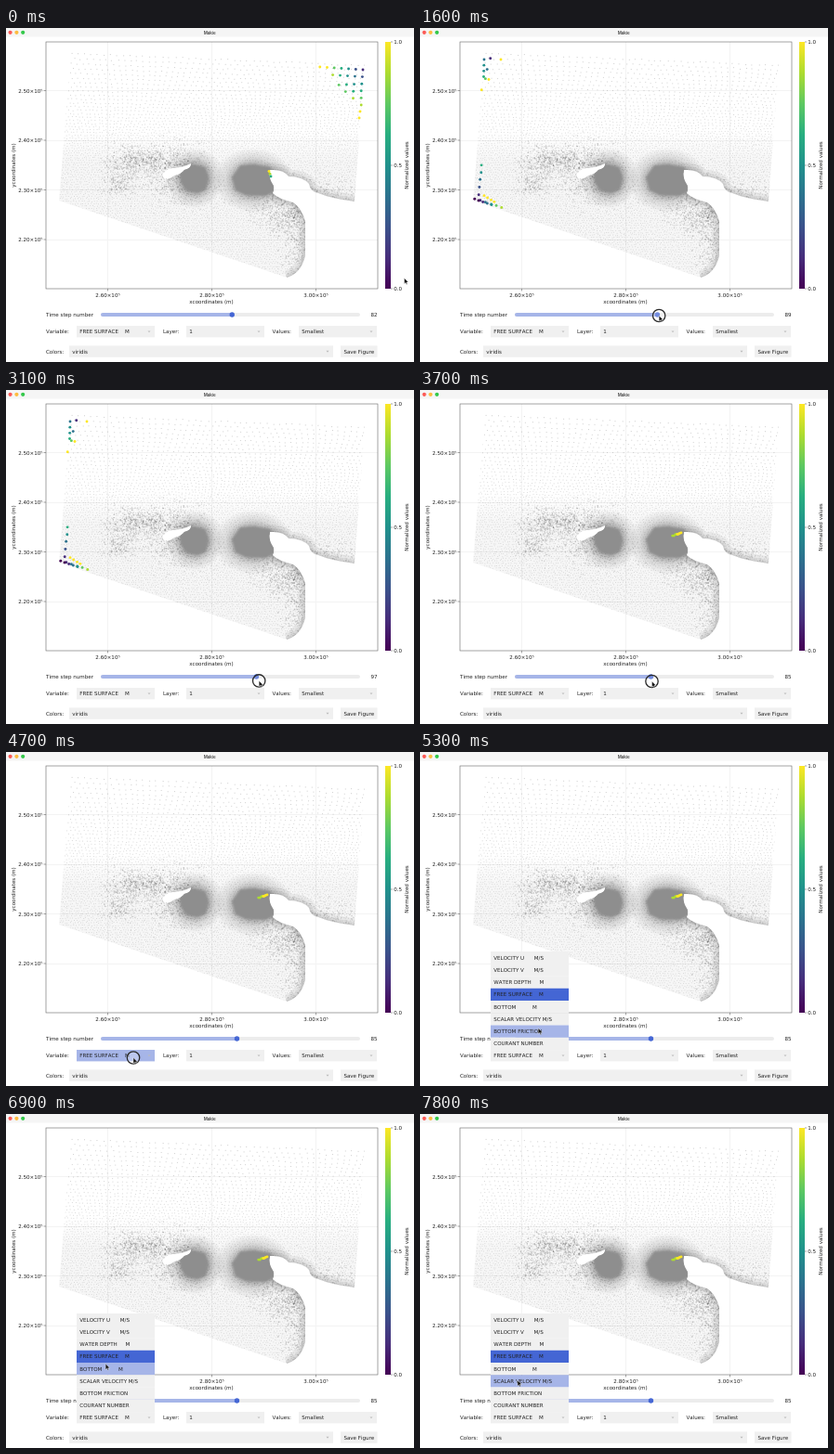
Animation, 439 px wide and 360 px high, one loop 8000 ms. Source, as an HTML page with a canvas:

```html
<!DOCTYPE html>
<html lang="en">
<head>
<meta charset="utf-8">
<title>Makie</title>
<style>
html, body { margin: 0; width: 100%; height: 100%; overflow: hidden; background: #fff; }
canvas, svg { position: absolute; left: 0; top: 0; width: 439px; height: 360px; display: block; }
text { font: 5.55px "DejaVu Sans", sans-serif; font-kerning: none; fill: #222; white-space: pre; }
.title { font: 600 4.5px Inter, sans-serif; fill: #444; }
</style>
</head>
<body>
<canvas id="mesh" width="439" height="360"></canvas>
<svg id="ui" viewBox="0 0 439 360"></svg>
<script>
const LOOP = 8000, STEP = 100;
const ACCENT = '#4466d4', DIM = '#a6b5e8', PANEL = '#f0f0f0';
const VIRIDIS = ['#440154', '#472d7b', '#3b528b', '#2c728e', '#21918c', '#28ae80', '#5ec962', '#addc30', '#fde725'];
const ui = document.getElementById('ui');

let seed = 11;
const rnd = () => (seed = (seed * 16807) % 2147483647) / 2147483647;
const jitter = size => (rnd() - 0.5) * size;

function add(tag, attrs, parent = ui) {
  const el = document.createElementNS('http://www.w3.org/2000/svg', tag);
  set(el, attrs);
  parent.appendChild(el);
  return el;
}
function set(el, attrs) { for (const k in attrs) el.setAttribute(k, attrs[k]); }
const show = (el, on) => { el.style.display = on ? '' : 'none'; };
const rect = (x, y, width, height, fill, parent) => add('rect', { x, y, width, height, fill }, parent);
const line = (x1, y1, x2, y2) => add('line', { x1, y1, x2, y2, stroke: '#666', 'stroke-width': 0.6 });
function label(x, y, str, anchor = 'start', parent = ui) {
  const el = add('text', { x, y: y + 2.05, 'text-anchor': anchor }, parent);
  el.textContent = str;
  return el;
}
function turned(x, y, str) {
  label(0, 0, str, 'middle').setAttribute('transform', `translate(${x} ${y}) rotate(-90)`);
}

const xTicks = [0, 1, 2].map(i => [109 + 112 * i, `${(2.6 + 0.2 * i).toFixed(2)}×10⁵`]);
const yTicks = [0, 1, 2, 3].map(i => [67.5 + 53.5 * i, `${(2.5 - 0.1 * i).toFixed(2)}×10⁵`]);

// ---- mesh ----
function drawMesh() {
  const g = document.getElementById('mesh').getContext('2d');
  g.fillStyle = '#f3f3f3';
  for (const [x] of xTicks) g.fillRect(x, 15, 1, 266);
  for (const [y] of yTicks) g.fillRect(43, Math.floor(y), 357, 1);

  const coast = 'L375 187Q350 184 336 178Q327 176 326 168Q319 160 304 160Q299 152 284 153Q282 160 286 167' +
    'Q290 172 287 178Q293 184 309 188Q318 194 322 208L322 246Q317 265 302 269';
  const isle = 'M168 158Q174 150 181 151Q191 150 199 146Q200 151 192 153Q188 158 181 159Q176 164 170 162Z';
  g.clip(new Path2D('M70 25L386 38' + coast + 'L57 186Z' + isle), 'evenodd');

  // soft shade that thickens below the coarse rows
  const shade = g.createLinearGradient(0, 110, 0, 145);
  shade.addColorStop(0, 'rgba(0,0,0,0)');
  shade.addColorStop(1, 'rgba(0,0,0,.035)');
  g.fillStyle = shade;
  g.fillRect(43, 110, 357, 170);

  // rows of nodes, closer together towards the middle
  for (let y = 27, row = 0; y < 270; row++) {
    const k = Math.min(1, (y - 27) / 100), dx = 7 - 4.2 * k;
    g.fillStyle = `rgba(0,0,0,${0.2 - 0.07 * k})`;
    for (let x = 56 + (row % 2) * dx / 2; x < 388; x += dx)
      g.fillRect(x + jitter(1.6), y + (x - 70) * 0.041 * (1 - k) + jitter(1.5), 1, 1);
    y += 5.6 - 3 * k;
  }

  // speckled shoals: centre, radii, number of nodes
  function cloud(cx, cy, rx, ry, n) {
    g.fillStyle = 'rgba(0,0,0,.13)';
    const gauss = () => rnd() + rnd() + rnd() - 1.5;
    for (let i = 0; i < n; i++) g.fillRect(cx + gauss() * rx, cy + gauss() * ry, 1.3, 1.3);
  }
  cloud(150, 142, 40, 14, 480);
  cloud(128, 150, 20, 28, 220);
  cloud(120, 169, 16, 10, 110);
  cloud(182, 158, 38, 34, 650);
  cloud(306, 198, 36, 24, 650);
  cloud(316, 236, 20, 70, 500);
  cloud(320, 176, 110, 18, 500);

  // darker rim along the coast
  g.strokeStyle = 'rgba(0,0,0,.06)';
  for (const w of [3, 8, 15]) {
    g.lineWidth = w;
    g.stroke(new Path2D('M375 187' + coast));
  }

  function halo(cx, cy, rx, ry) {
    g.save();
    g.translate(cx, cy);
    g.scale(rx, ry);
    const fade = g.createRadialGradient(0, 0, 0.4, 0, 0, 1);
    fade.addColorStop(0, 'rgba(0,0,0,.34)');
    fade.addColorStop(0.5, 'rgba(0,0,0,.11)');
    fade.addColorStop(1, 'rgba(0,0,0,0)');
    g.fillStyle = fade;
    g.fillRect(-1, -1, 2, 2);
    g.restore();
  }
  halo(203, 162, 32, 33);
  halo(266, 164, 43, 35);
  g.filter = 'blur(1.1px)';
  g.fillStyle = '#8e8e8e';
  g.fill(new Path2D('M187 153L199 147L214 150L218 161L215 174L206 178L194 175L188 166Z' +
    'M243 161L252 148L267 147L284 150L290 164L287 177L279 181L258 180L247 175Z'));
}
drawMesh();

// ---- window and axes ----
rect(0, 0, 439, 9.5, '#f5f5f5');
['#fc5b57', '#fdbc40', '#34c84a'].forEach((fill, i) => add('circle', { cx: 4.6 + i * 6.8, cy: 4.8, r: 2.1, fill }));
label(219.2, 4.6, 'Makie', 'middle').setAttribute('class', 'title');
add('rect', { x: 43, y: 15, width: 357, height: 266, fill: 'none', stroke: '#666', 'stroke-width': 0.6 });
for (const [x, s] of xTicks) { line(x + 0.5, 281, x + 0.5, 283.5); label(x + 0.5, 287.8, s, 'middle'); }
for (const [y, s] of yTicks) { line(40.5, y, 43, y); label(39.5, y, s, 'end'); }
label(221, 295, 'xcoordinates (m)', 'middle');
turned(8.3, 148, 'ycoordinates (m)');

const grad = add('linearGradient', { id: 'viridis', x1: 0, y1: 1, x2: 0, y2: 0 });
VIRIDIS.forEach((c, i) => add('stop', { offset: i / 8, 'stop-color': c }, grad));
add('rect', { x: 408, y: 15, width: 6, height: 266, fill: 'url(#viridis)' });
['1.0', '0.5', '0.0'].forEach((s, i) => {
  const y = 15 + 133 * i;
  line(414, y, 416, y);
  label(417.3, y, s);
});
turned(431.3, 148, 'Normalized values');

// ---- coloured points ----
const group = () => add('g', {});
const dot = (g, cx, cy, c) => add('circle', { cx, cy, r: 1.45, fill: VIRIDIS[Math.round(Math.min(8, c))] }, g);

// n points on a line, colour index from c0 to c1
function run(g, n, x0, y0, x1, y1, c0, c1, loose = 0) {
  for (let i = 0; i < n; i++) {
    const k = i / (n - 1);
    dot(g, x0 + (x1 - x0) * k + jitter(loose), y0 + (y1 - y0) * k + jitter(loose), c0 + (c1 - c0) * k);
  }
}

// fan in the corner: values grow with the distance from it
const right = group();
[7, 5, 4, 3, 2, 1].forEach((n, row) => {
  for (let j = 0; j < n; j++) {
    const dx = j * (7.7 + row * 0.25) + Math.min(row, 3) * 0.6, dy = row * 7.6 - j * 0.5 + (row > 1 ? j * 0.9 : 0);
    dot(right, 384 - dx, 45 + dy, 1 + 0.17 * Math.hypot(dx, dy));
  }
});
const rightEarly = group();
run(rightEarly, 2, 381, 90, 380, 97, 8, 8);
run(rightEarly, 3, 283, 154.5, 285, 160, 8, 5);
const rightLate = group();
run(rightLate, 3, 275, 157.5, 279, 154.7, 7, 8);

const left = group();
run(left, 4, 69, 34, 68.5, 52.5, 3, 5);
run(left, 4, 76, 33, 67, 67, 1, 8, 2);
run(left, 2, 87, 34, 74, 55.5, 8, 8);
run(left, 5, 66.5, 147.5, 63, 180, 5, 1, 1);
run(left, 6, 59, 184, 88, 193.5, 0, 7, 1);
run(left, 4, 63, 186, 77, 190.5, 0, 4);
run(left, 4, 69.5, 181, 80, 187.5, 8, 8, 1);

const centre = group();
run(centre, 8, 271.5, 157, 281, 154.4, 7, 8, 1);

// ---- controls ----
label(43, 309, 'Time step number');
const bar = (width, fill) => add('rect', { x: 102, y: 306.9, width, height: 4.2, rx: 2.1, fill });
bar(279, '#ececec');
const filled = bar(0, DIM);
const knob = add('circle', { cy: 309, r: 2.7, fill: ACCENT });
const count = label(399.5, 309, '', 'end');

function menu(x, y, w, str) {
  const box = rect(x, y, w, 12.4, PANEL);
  label(x + 3.3, y + 6.2, str);
  add('path', { d: `M${x + w - 7.5} ${y + 5.4}h3l-1.5 1.9z`, fill: '#bbb' });
  return box;
}
label(43, 327.2, 'Variable:');
const varBox = menu(76, 321, 84, 'FREE SURFACE    M');
label(169, 327.2, 'Layer:');
menu(194, 321, 84, '1');
label(286.5, 327.2, 'Values:');
menu(315, 321, 84, 'Smallest');
label(43, 348.6, 'Colors:');
menu(68, 342.4, 284, 'viridis');
rect(360, 342.4, 39.5, 12.4, PANEL);
label(379.8, 348.6, 'Save Figure', 'middle');

const ROWS = ['VELOCITY U      M/S', 'VELOCITY V      M/S', 'WATER DEPTH     M', 'FREE SURFACE    M',
  'BOTTOM          M', 'SCALAR VELOCITY M/S', 'BOTTOM FRICTION', 'COURANT NUMBER'];
const ROW_H = 13.25, LIST_Y = 215, CHOSEN = 3;
const list = group();
const rows = ROWS.map((s, i) => {
  const y = LIST_Y + i * ROW_H, box = rect(76, y, 84, ROW_H + 0.05, PANEL, list);
  label(79.3, y + ROW_H / 2, s, 'start', list);
  return box;
});

const ring = add('circle', { r: 6.7, fill: 'rgba(255,255,255,.25)', stroke: '#2a2a2a', 'stroke-width': 1.3 });
const cursor = add('path', { d: 'M0 0V6.2L1.5 4.9L2.4 7L3.4 6.6L2.5 4.5H4.5Z', fill: '#111', stroke: '#fff', 'stroke-width': 0.4 });

// ---- motion: time, then values ----
const PATH = [[0, 428.5, 269.5], [900, 403, 238], [1100, 244, 307.5], [1600, 257, 310], [2600, 291, 313], [3700, 249.5, 314],
  [3900, 274, 283], [4400, 146, 329.5], [4700, 137, 329.5], [5000, 137, 329.5], [5800, 111, 244.5], [6300, 111, 244.5],
  [7000, 106.5, 273.5], [7300, 106, 275], [7800, 105, 287], [LOOP, 105, 287]];
const VALUE = [[0, 82], [1300, 82], [1600, 89], [2600, 107], [3700, 85], [LOOP, 85]];

function at(table, t) {
  let i = 1;
  while (i < table.length - 1 && table[i][0] <= t) i++;
  const a = table[i - 1], b = table[i], k = (t - a[0]) / (b[0] - a[0]);
  return a.slice(1).map((v, j) => v + (b[j + 1] - v) * k);
}
const between = (t, a, b) => t >= a && t < b;

function render(t) {
  const n = Math.round(at(VALUE, t)[0]);
  const w = (n - 1) * 279 / 160;
  const dragging = between(t, 1300, 3800);
  let [x, y] = at(PATH, t);
  if (between(t, 1100, 3700)) x = 244 + (n - 82) * 1.88;

  set(filled, { width: w });
  set(knob, { cx: 102 + w });
  count.textContent = n;

  const early = n < 84, late = n >= 98;
  show(right, early || late);
  show(rightEarly, early);
  show(rightLate, late);
  show(centre, between(n, 84, 87));
  show(left, between(n, 87, 98));

  const overBox = between(x, 76, 160) && between(y, 321, 334);
  set(varBox, { fill: overBox ? DIM : PANEL });
  show(list, t >= 5000);
  const hover = Math.floor((y + 0.5 - LIST_Y) / ROW_H);
  rows.forEach((r, i) => set(r, { fill: i === CHOSEN ? ACCENT : i === hover ? DIM : PANEL }));

  show(ring, dragging || between(t, 4700, 5000));
  set(ring, { cx: x, cy: y });
  set(cursor, { transform: `translate(${x} ${y})` });
}

const start = performance.now();
function tick() {
  const t = (performance.now() - start) % LOOP;
  render(Math.floor(t / STEP) * STEP);
  requestAnimationFrame(tick);
}
tick();
</script>
</body>
</html>
```
